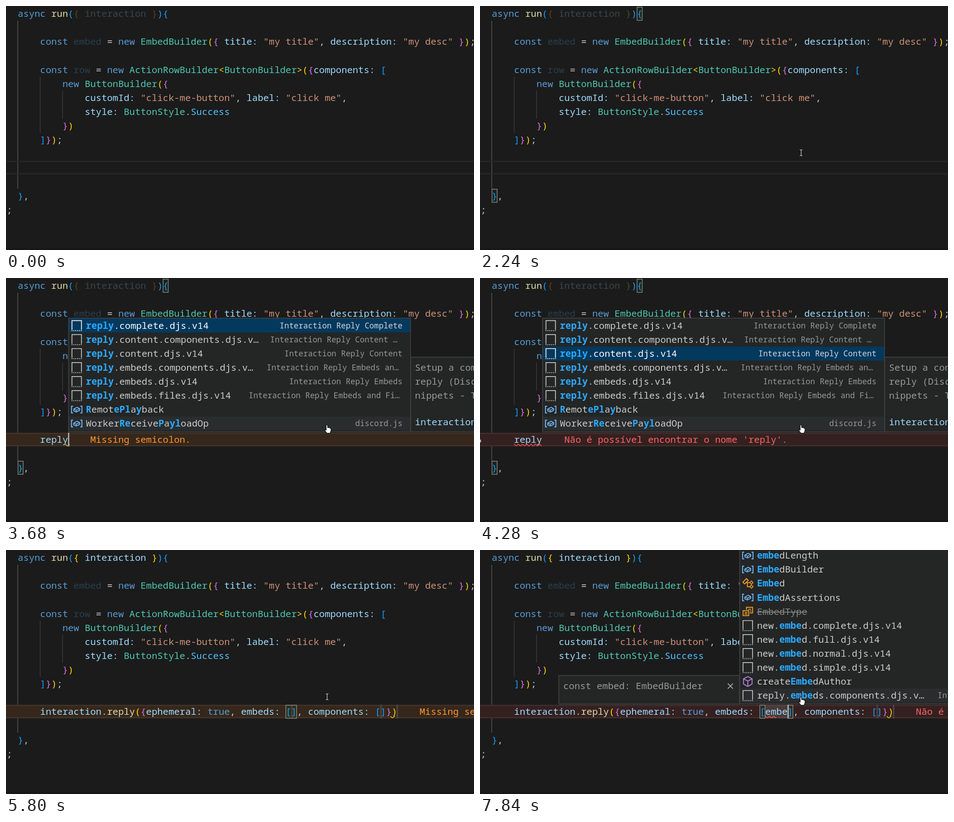
Animation of 1034x542 px, one loop 8000 ms. Source, as an HTML page with a canvas:

```html
<!DOCTYPE html>
<html lang="en">
<head>
<meta charset="utf-8">
<title>Snippet completion</title>
<style>
html, body { margin: 0; width: 100%; height: 100%; overflow: hidden; background: #1b1b1b; }
canvas { display: block; width: 1034px; height: 542px; }
</style>
</head>
<body>
<canvas id="stage" width="1034" height="542"></canvas>
<script>
const ctx = document.getElementById('stage').getContext('2d');
const W = 1034, H = 542, LOOP = 8000, STEP = 40;
const CW = 12.33, LH = 31.1, X0 = 26, Y0 = 1.6, BASE = 22.6, LINE = 11;
const FAMILY = '"Noto Sans Mono", "DejaVu Sans Mono", monospace';
const FONT = `${CW / 0.6}px ${FAMILY}`;
const BOLD = `bold ${FONT}`;
const SMALL = `17.4px ${FAMILY}`;

const COLOR = {
  key: '#569cd6', fn: '#dcdcaa', type: '#4ec9b0', prop: '#9cdcfe', str: '#ce9178',
  txt: '#cccccc', gold: '#ffd700', pink: '#da70d6', blue: '#179fff', val: '#4fc1ff',
  off: '#27404e', dimProp: '#3a454b', dimGold: '#51461b'
};
const PANEL = '#242525', BORDER = '#454545', MATCH = '#2aaaff';
const WARN = { bg: '#35271b', edge: '#423329', ink: '#ff942f', text: 'Missing semicolon.' };
const fail = name => ({
  bg: '#352020', edge: '#432e2d', ink: '#ff6464',
  text: `Não é possível encontrar o nome '${name}'.`
});

const colX = c => X0 + c * CW;
const rowY = r => Y0 + r * LH;

// Code rows: row, column, then colour and text in turn
const CODE = [
  [2, 4, 'key', 'const ', 'off', 'embed', 'txt', ' = ', 'key', 'new ', 'type', 'EmbedBuilder', 'gold', '(',
    'pink', '{ ', 'prop', 'title: ', 'str', '"my title"', 'txt', ', ', 'prop', 'description: ',
    'str', '"my desc"', 'pink', ' }', 'gold', ')', 'txt', ';'],
  [4, 4, 'key', 'const ', 'off', 'row', 'txt', ' = ', 'key', 'new ', 'type', 'ActionRowBuilder', 'gold', '<',
    'type', 'ButtonBuilder', 'gold', '>(', 'pink', '{', 'prop', 'components: ', 'blue', '['],
  [5, 8, 'key', 'new ', 'type', 'ButtonBuilder', 'gold', '(', 'pink', '{'],
  [6, 12, 'prop', 'customId: ', 'str', '"click-me-button"', 'txt', ', ', 'prop', 'label: ',
    'str', '"click me"', 'txt', ','],
  [7, 12, 'prop', 'style: ', 'type', 'ButtonStyle', 'txt', '.', 'val', 'Success'],
  [8, 8, 'pink', '}', 'gold', ')'],
  [9, 4, 'blue', ']', 'pink', '}', 'gold', ')', 'txt', ';'],
  [13, 0, 'blue', '}', 'txt', ','],
  [14, -2, 'txt', ';']
];

// Completion items: icon, label with {matches}, detail, detail offset when cut short
const REPLIES = [
  ['snippet', '{reply}.complete.djs.v14', 'Interaction Reply Complete'],
  ['snippet', '{reply}.content.components.djs.v…', 'Interaction Reply Content …', 446],
  ['snippet', '{reply}.content.djs.v14', 'Interaction Reply Content'],
  ['snippet', '{reply}.embeds.components.djs.v…', 'Interaction Reply Embeds an…', 438.5],
  ['snippet', '{reply}.embeds.djs.v14', 'Interaction Reply Embeds'],
  ['snippet', '{reply}.embeds.files.djs.v14', 'Interaction Reply Embeds and Fi…', 398.5]
];
const REP_TAIL = [
  ['value', '{Rep}ort'], ['value', '{Rep}ortBody'], ['value', '{Rep}ortingObserver'],
  ['cube', '{re}solve{P}artialEmoji', 'discord.js'], ['value', '{Re}mote{P}layback']
];
const REPLY_TAIL = [
  ['value', '{R}emot{ePl}a{y}back'], ['value', 'Worker{Re}ceive{P}a{yl}oadOp', 'discord.js']
];
const EMBEDS = [
  ['value', 'embedLength'], ['value', 'EmbedBuilder'], ['class', 'Embed'], ['value', 'EmbedAssertions'],
  ['enum', 'EmbedType'], ['snippet', 'new.embed.complete.djs.v14'], ['snippet', 'new.embed.full.djs.v14'],
  ['snippet', 'new.embed.normal.djs.v14'], ['snippet', 'new.embed.simple.djs.v14'],
  ['cube', 'createEmbedAuthor'],
  ['snippet', 'reply.embeds.components.djs.v…', 'Interaction Reply Embeds an…', 438]
];
const DOCS = [
  ['Setup a complete', 'reply (Discord', 'nippets - Type'],
  ['Setup a content', 'components rep', 'd.js v14 Code', 'escript)'],
  ['Setup a content', 'reply (Discord', 'nippets - Type'],
  ['Setup a embeds', 's interaction', 'd.js v14 Code', 'escript)']
];

const latest = (steps, t, start) => steps.reduce((v, s) => t >= s[0] ? s[1] : v, start);
const within = (spans, t) => spans.some(([a, b]) => t >= a && t < b);

function rect(x, y, w, h, fill) {
  ctx.fillStyle = fill;
  ctx.fillRect(x, y, w, h);
}

function text(s, x, y, fill, font = FONT) {
  ctx.font = font;
  ctx.fillStyle = fill;
  ctx.fillText(s, x, y);
}

function poly(points, color, { width = 2, close = false, fill } = {}) {
  ctx.beginPath();
  points.forEach(([x, y]) => ctx.lineTo(x, y));
  if (close) ctx.closePath();
  if (fill) { ctx.fillStyle = fill; ctx.fill(); }
  ctx.strokeStyle = color;
  ctx.lineWidth = width;
  ctx.stroke();
}

function panel(x, y, w, h) {
  rect(x, y, w, h, PANEL);
  ctx.strokeStyle = BORDER;
  ctx.lineWidth = 1.5;
  ctx.strokeRect(x + 0.75, y + 0.75, w - 1.5, h - 1.5);
}

function codeRow([row, col, ...parts]) {
  for (let i = 0; i < parts.length; i += 2) {
    text(parts[i + 1], colX(col), rowY(row) + BASE, COLOR[parts[i]]);
    col += parts[i + 1].length;
  }
}

function bracketBox(row, col, cells = 1) {
  const x = colX(col) + 0.5, y = rowY(row) + 1;
  rect(x, y, CW * cells, LH - 2, 'rgba(0,100,0,.12)');
  ctx.strokeStyle = '#888888';
  ctx.lineWidth = 1.5;
  ctx.strokeRect(x, y, CW * cells - 1, LH - 2);
}

function squiggle(x, w, color) {
  const pts = [];
  for (let d = 0; d <= w; d++) pts.push([x + d, rowY(LINE) + 27.5 - 1.8 * Math.cos(d * Math.PI / 4.7)]);
  poly(pts, color, { width: 1.7 });
}

const ICON = {
  snippet(x, y, c) {
    poly([[x - 10.5, y + 9.5], [x - 10.5, y - 11], [x + 10.5, y - 11], [x + 10.5, y + 9.5]], c, { width: 1.7 });
    for (let i = 0; i < 6; i++) rect(x - 11.3 + i * 4.1, y + 10.5, 2, 1.8, c);
  },
  value(x, y) {
    const c = '#75beff';
    for (const s of [-1, 1])
      poly([[x + s * 8, y - 7.5], [x + s * 11.5, y - 7.5], [x + s * 11.5, y + 7.5], [x + s * 8, y + 7.5]], c);
    poly([[x - 6.5, y - 1], [x + 1, y - 5], [x + 6.5, y - 2], [x + 6.5, y + 2], [x - 1, y + 5.5], [x - 6.5, y + 3]],
      c, { width: 1.8, close: true });
    poly([[x - 6.5, y - 1], [x - 1, y + 1.5], [x + 6.5, y - 2]], c, { width: 1.5 });
    poly([[x - 1, y + 1.5], [x - 1, y + 5.5]], c, { width: 1.5 });
  },
  cube(x, y) {
    const c = '#b180d7';
    poly([[x, y - 11], [x + 9.5, y - 6], [x + 9.5, y + 5.5], [x, y + 11], [x - 9.5, y + 5.5], [x - 9.5, y - 6]],
      c, { close: true });
    poly([[x - 9.5, y - 6], [x, y - 1], [x + 9.5, y - 6]], c);
    poly([[x, y - 1], [x, y + 11]], c);
  },
  class(x, y) {
    const c = '#ee9d28';
    const diamond = (a, b, r) => poly([[a, b - r], [a + r, b], [a, b + r], [a - r, b]], c, { close: true, width: 1.8 });
    poly([[x - 11, y - 3], [x - 3, y - 11], [x + 1, y - 7], [x - 7, y + 1]], c, { close: true });
    poly([[x - 4, y - 2], [x + 5, y - 2]], c);
    poly([[x - 1, y - 2], [x - 1, y + 7], [x + 5, y + 7]], c);
    diamond(x + 8, y - 2, 3.6);
    diamond(x + 8, y + 7, 3.6);
  },
  enum(x, y) {
    const c = '#ee9d28';
    poly([[x - 3, y - 4], [x - 3, y - 9.5], [x + 10.5, y - 9.5], [x + 10.5, y + 3], [x + 4, y + 3]], c);
    poly([[x - 10.5, y - 2], [x + 2, y - 2], [x + 2, y + 9], [x - 10.5, y + 9]], c, { close: true });
    poly([[x + 1, y - 5], [x + 7, y - 5]], c);
    poly([[x + 5, y - 1], [x + 8, y - 1]], c);
    poly([[x - 7, y + 2], [x - 1, y + 2]], c);
    poly([[x - 7, y + 5.5], [x - 1, y + 5.5]], c);
  }
};

function itemLabel(label, x, y, ink) {
  label.split(/[{}]/).forEach((part, i) => {
    text(part, x, y, i % 2 ? MATCH : ink, i % 2 ? BOLD : FONT);
    x += part.length * CW;
  });
}

// The list always ends just above the edited line
function suggest(x, items, picked = -1) {
  const top = 338.8 - items.length * LH;
  panel(x, top - 1.5, 757, 344 - top);
  items.forEach(([icon, label, detail, offset], i) => {
    const y = top + i * LH, mid = y + LH / 2, on = i === picked;
    if (on) rect(x + 1.5, y, 754, LH, '#04395e');
    else if (i === items.length - 1) rect(x + 1.5, y, 754, LH, '#2a2d2e');
    ICON[icon](x + 18.7, mid, on ? '#ffffff' : '#cccccc');
    const old = icon === 'enum';
    itemLabel(label, x + 39, mid + 7, on ? '#ffffff' : old ? '#858585' : COLOR.txt);
    if (old) rect(x + 39, mid + 0.5, label.length * CW, 1.7, '#858585');
    if (detail) text(detail, x + (offset || 738.5 - detail.length * 10.44), mid + 6, on ? '#d0d7dd' : '#979797', SMALL);
  });
}

function details(x, lines, bottomText, bottomColor, bottomY) {
  const top = 342.5 - (lines.length + 2) * LH - 12;
  panel(x, top, 400, 342.5 - top);
  lines.forEach((s, i) => text(s, x + 10, top + 30.5 + i * LH, '#989898'));
  text(bottomText, x + 10, bottomY, bottomColor);
}

function beam(x, y) {
  poly([[x - 3, y - 6.5], [x - 1, y - 6.5], [x, y - 5.5], [x + 1, y - 6.5], [x + 3, y - 6.5]], '#d8d8d8', { width: 1.2 });
  poly([[x - 3, y + 6.5], [x - 1, y + 6.5], [x, y + 5.5], [x + 1, y + 6.5], [x + 3, y + 6.5]], '#d8d8d8', { width: 1.2 });
  poly([[x, y - 6], [x, y + 6]], '#d8d8d8', { width: 1.2 });
}

function hand(x, y) {
  poly([[x - 2, y + 1], [x - 1, y], [x + 1, y + 1], [x + 1, y + 6], [x + 6, y + 7], [x + 8.5, y + 9], [x + 8.5, y + 13],
    [x + 6.5, y + 18.5], [x - 0.5, y + 18.5], [x - 5, y + 12.5], [x - 5, y + 10.5], [x - 2, y + 12]],
    '#111111', { width: 1.2, close: true, fill: '#ffffff' });
}

const ease = p => p * p * (3 - 2 * p);

function pointer(t) {
  const glide = (a, b, x0, y0, x1, y1) => {
    const p = ease(Math.min(1, Math.max(0, (t - a) / (b - a))));
    return [x0 + (x1 - x0) * p, y0 + (y1 - y0) * p];
  };
  return t < 1680 ? glide(840, 1640, 969.5, 76, 692, 352) : glide(1680, 2200, 692, 352, 709.5, 326);
}

function editor(t, lit, matched) {
  rect(0, 0, W, H, '#1b1b1b');
  rect(0, 538, W, 4, '#171717');
  rect(25.2, rowY(1), 1.5, LH * 12, '#555555');
  rect(74.8, rowY(5), 1.5, LH * 4, '#3c3c3c');
  rect(124.2, rowY(6), 1.5, LH * 2, '#3c3c3c');
  if (matched) { bracketBox(0, 26); bracketBox(13, 0); }
  const brace = lit ? 'gold' : 'dimGold';
  codeRow([0, 0, 'key', 'async ', 'fn', 'run', 'blue', '(', brace, '{ ',
    lit ? 'prop' : 'dimProp', 'interaction', brace, ' }', 'blue', '){']);
  CODE.forEach(codeRow);
}

function activeLine(note, endCol) {
  const y = rowY(LINE);
  if (note) rect(0, y, W, 30.4, note.bg);
  const edge = note ? note.edge : '#282828';
  rect(0, y + 0.2, W, 2.6, edge);
  rect(0, y + 27.6, W, 2.6, edge);
  if (note) text(note.text, colX(endCol + 4), y + BASE, note.ink);
}

function draw(t) {
  const done = t >= 5280;
  const word = latest([[3200, 'r'], [3240, 're'], [3320, 'rep'], [3520, 'repl'], [3640, 'reply']], t, '');
  const arg = latest([[6520, 'e'], [6560, 'em'], [7800, 'emb'], [7840, 'embe']], t, '');
  const note = latest([[3320, WARN], [4120, fail('reply')], [5680, WARN], [7040, fail('em')]], t, null);
  const endCol = done ? 68 + arg.length : 4 + word.length;
  const caretCol = done ? 49 + arg.length : endCol;

  editor(t, t >= 5600, t >= 1640 && !done);
  activeLine(note, endCol);

  const top = rowY(LINE);
  if (done) {
    const n = arg.length, stop = 'rgba(124,124,124,.3)';
    if (n) rect(colX(49), top, n * CW, 30.4, stop);
    if (n) { bracketBox(LINE, 48); bracketBox(LINE, 49 + n); } else bracketBox(LINE, 48, 2);
    rect(colX(49 + n), top, 3, 30.4, stop);
    rect(colX(65 + n) - 1, top, 4, 30.4, stop);
    rect(colX(68 + n) - 2, top, 4, 30.4, stop);
    codeRow([LINE, 4, 'prop', 'interaction', 'txt', '.', 'fn', 'reply', 'gold', '(', 'pink', '{',
      'prop', 'ephemeral: ', 'key', 'true', 'txt', ', ', 'prop', 'embeds: ', 'blue', '[', 'prop', arg,
      'blue', ']', 'txt', ', ', 'prop', 'components: ', 'blue', '[]', 'pink', '}', 'gold', ')']);
    if (t >= 5680) squiggle(colX(67 + n) - 3, 10, '#d7b900');
    if (t >= 7040) squiggle(colX(49), CW * 2, '#f14c4c');
  } else {
    codeRow([LINE, 4, 'prop', word]);
    if (note === WARN) squiggle(colX(endCol) - 6, 10, '#d7b900');
    else if (note) {
      squiggle(colX(4), CW * 5, '#f14c4c');
      ctx.beginPath();
      ctx.arc(-1.5, 362, 4, 0, 7);
      ctx.fillStyle = '#9db8c8';
      ctx.fill();
    }
  }

  if (within([[1720, 2240], [2800, 4120], [4600, 5120], [5280, 5800], [6240, 7120], [7600, LOOP]], t))
    rect(colX(caretCol), top, 2.8, 30.4, '#aeafad');

  const x = Math.round(colX(endCol)) + 0.5;
  const open = (t >= 3280 && !done) || t >= 6560;
  if (t >= 6560) {
    panel(173.5, 278, 400.5, 65);
    text('const embed: EmbedBuilder', 184, 309, '#989898');
    poly([[547.5, 296.5], [559, 308]], '#c5c5c5', { width: 1.6 });
    poly([[559, 296.5], [547.5, 308]], '#c5c5c5', { width: 1.6 });
    const hit = new RegExp(arg, 'i');
    suggest(573, EMBEDS.map(([icon, label, ...rest]) =>
      [icon, icon === 'enum' ? label : label.replace(hit, '{$&}'), ...rest]));
  } else if (open && t < 3520) {
    const cut = REPLIES.map(([icon, label, ...rest]) => [icon, label.replace('{reply}', '{rep}ly'), ...rest]);
    suggest(x, [...cut, ...REP_TAIL]);
    rect(x + 739, 0, 17, 70, '#4f4f4f');
    details(x + 756, ['function reportError', 'y): void'], 'MDN Reference', '#3794ff', 327.5);
  } else if (open) {
    const picked = latest([[3920, 1], [4240, 2], [4520, 3]], t, 0);
    const cut = word === 'repl' ? '{repl}y' : '{reply}';
    const items = REPLIES.map(([icon, label, ...rest]) => [icon, label.replace('{reply}', cut), ...rest]);
    suggest(x, [...items, ...REPLY_TAIL], picked);
    details(x + 756, DOCS[picked], 'interaction.reply', COLOR.prop, 326.5);
  }

  if (t >= 600) {
    const [px, py] = pointer(t);
    if (open) hand(px, py); else beam(px, py);
  }
}

function frame(now) {
  draw(Math.floor((now % LOOP) / STEP) * STEP);
  requestAnimationFrame(frame);
}
requestAnimationFrame(frame);
</script>
</body>
</html>
```
